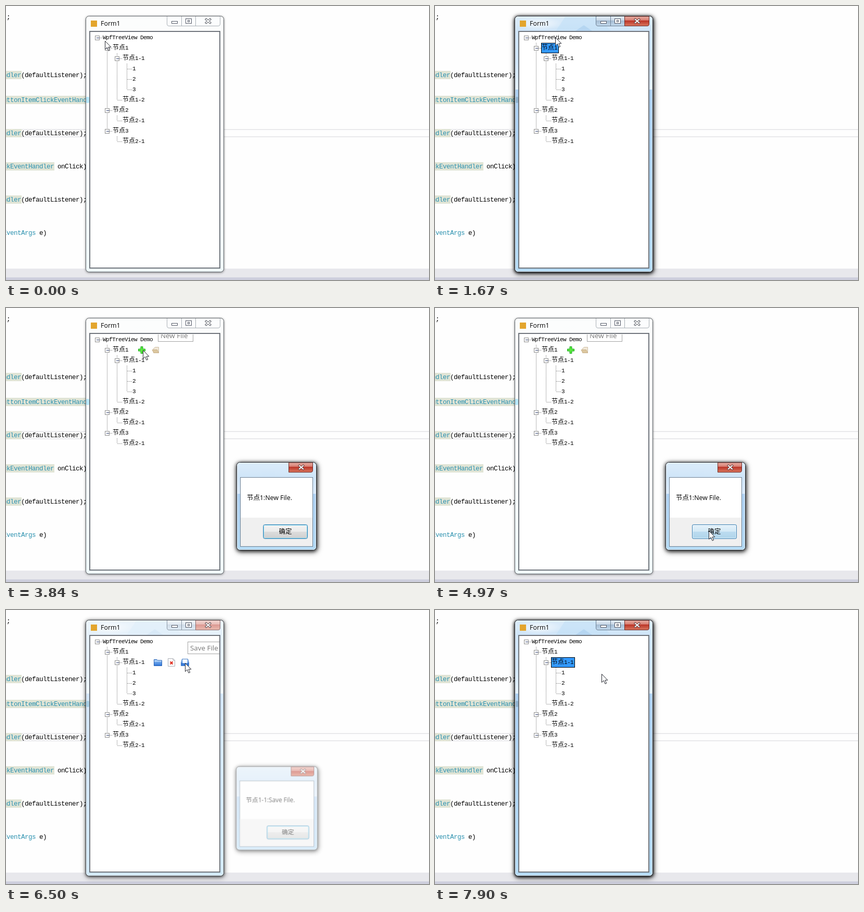
An HTML page for the animation above (8 s loop, 813 px wide and 528 px high).

```html
<!DOCTYPE html>
<html lang="zh">
<head>
<meta charset="utf-8">
<title>Tree view demo</title>
<style>
html, body { margin: 0; width: 100%; height: 100%; overflow: hidden; background: #fefefe; }
svg { display: block; width: 813px; height: 528px; }
text { white-space: pre; }
.code { font: 12.5px "Liberation Mono", monospace; letter-spacing: -.5px; }
.tree { font: 11px "Liberation Mono", monospace; letter-spacing: -.6px; }
.tree .han { font: 12px "Noto Sans CJK SC", "Noto Sans CJK", sans-serif; letter-spacing: 0; }
.ui { font: 12.4px "Open Sans", "Noto Sans CJK SC", "Noto Sans CJK", sans-serif; }
.tip text { font: 13.4px "Open Sans", sans-serif; fill: #777; }
.tip rect { fill: #fff; stroke: #a3a3a3; }
.type { fill: #2b91af; }
.mark { fill: #e0e4d5; }
.crisp { shape-rendering: crispEdges; }
.dots { stroke: #777; stroke-dasharray: 1 1; fill: none; }
.calm { filter: drop-shadow(0 1px 2px rgba(0,0,0,.45)); }
.deep { filter: drop-shadow(0 1px 3px rgba(0,0,0,.6)) drop-shadow(1px 2px 5px rgba(0,0,0,.75)); }

.anim { animation: 8s step-end -4ms infinite; }
#active { animation-name: active; }
#sel1 { animation-name: sel1; }
#sel2 { animation-name: sel2; }
#tools1 { animation-name: tools1; }
#tools2 { animation-name: tools2; }
#tip1 { animation-name: tip1; }
#tip2 { animation-name: tip2; }
#dlg1 { animation-name: dlg1; }
#dlg2 { animation-name: dlg2; }
#hot1 { animation-name: hot1; }
#hot2 { animation-name: hot2; }
#cursor { animation-name: move; }
#dlg1, #dlg2 { transform-box: fill-box; transform-origin: center; }

@keyframes active {
  0% { opacity: 0 } 1.625% { opacity: .6 } 3.5% { opacity: 1 }
  45% { opacity: .5 } 46.5% { opacity: 0 } 64% { opacity: .5 } 65.75% { opacity: 1 }
  81.25% { opacity: .5 } 83% { opacity: 0 } 95.375% { opacity: .5 } 97.125% { opacity: 1 }
}
@keyframes sel1 { 0%, 45%, 81.25% { opacity: 0 } 1.625%, 64% { opacity: 1 } }
@keyframes sel2 { 0% { opacity: 0 } 95.375% { opacity: 1 } }
@keyframes tools1 {
  0%, 20.875%, 29.375%, 64% { opacity: 0 }
  19.125%, 26%, 34.5% { opacity: 1 }
}
@keyframes tools2 { 0%, 34.5%, 95.375% { opacity: 0 } 29.375%, 70.875% { opacity: 1 } }
@keyframes tip1 { 0%, 64% { opacity: 0 } 41.625% { opacity: 1 } }
@keyframes tip2 { 0%, 95.375% { opacity: 0 } 77.75% { opacity: 1 } }
@keyframes dlg1 {
  0%, 65.75% { opacity: 0; transform: none }
  45% { opacity: .5; transform: scale(.95) }
  46.5% { opacity: .9; transform: scale(.99) }
  48% { opacity: 1; transform: none }
  64% { opacity: .4; transform: scale(.96) }
}
@keyframes dlg2 {
  0%, 97.125% { opacity: 0; transform: none }
  81.25% { opacity: .5; transform: scale(.95) }
  83% { opacity: .9; transform: scale(.99) }
  84.625% { opacity: 1; transform: none }
  95.375% { opacity: .4; transform: scale(.96) }
}
@keyframes hot1 { 0% { opacity: 0 } 60.375% { opacity: 1 } }
@keyframes hot2 { 0% { opacity: 0 } 90% { opacity: 1 } }
@keyframes move {
  0% { transform: translate(190px,67px) }
  10.75% { transform: translate(178px,120px) }
  12.375% { transform: translate(172px,200px) }
  14% { transform: translate(185px,247px) }
  15.75% { transform: translate(200px,170px) }
  17.375% { transform: translate(196px,112px) }
  19.125% { transform: translate(212px,82px) }
  20.875% { transform: translate(231px,60px) }
  22.375% { transform: translate(238px,52px) }
  24.25% { transform: translate(230px,60px) }
  26% { transform: translate(212px,76px) }
  27.625% { transform: translate(205px,85px) }
  29.375% { transform: translate(225px,96px) }
  31.125% { transform: translate(240px,96px) }
  32.875% { transform: translate(236px,92px) }
  34.5% { transform: translate(228px,84px) }
  36.25% { transform: translate(231px,80px) }
  38.125% { transform: translate(272px,80px) }
  41.625% { transform: translate(263px,81px) }
  55% { transform: translate(300px,130px) }
  56.75% { transform: translate(400px,270px) }
  58.625% { transform: translate(490px,390px) }
  60.375% { transform: translate(524px,428px) }
  62.125% { transform: translate(526px,429px) }
  65.75% { transform: translate(420px,320px) }
  67.375% { transform: translate(300px,170px) }
  68.875% { transform: translate(270px,125px) }
  70.875% { transform: translate(260px,105px) }
  72.75% { transform: translate(285px,103px) }
  74.375% { transform: translate(318px,102px) }
  76.125% { transform: translate(338px,101px) }
  77.75% { transform: translate(344px,102px) }
  84.625% { transform: translate(360px,130px) }
  86.375% { transform: translate(425px,280px) }
  88.125% { transform: translate(481px,402px) }
  90% { transform: translate(520px,430px) }
  91.75% { transform: translate(528px,432px) }
  97.125% { transform: translate(440px,300px) }
  98.75% { transform: translate(320px,123px) }
}
</style>
</head>
<body>
<svg viewBox="0 0 813 528">
  <defs>
    <linearGradient id="glass" x2="0" y2="1">
      <stop stop-color="#dcecfa"/><stop offset=".06" stop-color="#cfe5f8"/>
      <stop offset=".18" stop-color="#cfe5f9"/><stop offset=".287" stop-color="#e4f1fd"/>
      <stop offset=".287" stop-color="#abcff2"/><stop offset="1" stop-color="#b5dbf5"/>
    </linearGradient>
    <linearGradient id="pane" x2="0" y2="1">
      <stop stop-color="#dcecfa"/><stop offset=".17" stop-color="#cfe5f8"/>
      <stop offset=".36" stop-color="#dcebfb"/>
      <stop offset=".36" stop-color="#b0d2f3"/><stop offset="1" stop-color="#b5dbf5"/>
    </linearGradient>
    <linearGradient id="pale" x2="0" y2="1">
      <stop stop-color="#fcfdfd"/><stop offset=".5" stop-color="#f9fbfc"/><stop offset="1" stop-color="#eff8fa"/>
    </linearGradient>
    <linearGradient id="red" x2="0" y2="1">
      <stop stop-color="#e9b1a6"/><stop offset=".45" stop-color="#d5766a"/>
      <stop offset=".45" stop-color="#bb3528"/><stop offset="1" stop-color="#d9775f"/>
    </linearGradient>
    <linearGradient id="steel" x2="0" y2="1">
      <stop stop-color="#e3edf6"/><stop offset=".45" stop-color="#c6d6e6"/>
      <stop offset=".45" stop-color="#a5bcd3"/><stop offset="1" stop-color="#c3daee"/>
    </linearGradient>
    <linearGradient id="grey" x2="0" y2="1">
      <stop stop-color="#f3f3f3"/><stop offset=".5" stop-color="#ebebeb"/>
      <stop offset=".5" stop-color="#dddddd"/><stop offset="1" stop-color="#cfcfcf"/>
    </linearGradient>
    <linearGradient id="sky" x2="0" y2="1">
      <stop stop-color="#e6f2fa"/><stop offset=".5" stop-color="#d3e9f6"/>
      <stop offset=".5" stop-color="#bcdcf0"/><stop offset="1" stop-color="#b0d5ea"/>
    </linearGradient>
    <linearGradient id="blue" x2="0" y2="1">
      <stop stop-color="#9cc9f8"/><stop offset="1" stop-color="#2c72d6"/>
    </linearGradient>
    <radialGradient id="shine">
      <stop stop-color="#fff" stop-opacity=".75"/><stop offset="1" stop-color="#fff" stop-opacity="0"/>
    </radialGradient>
    <clipPath id="view"><path d="M162 51H410V504H162Z"/></clipPath>
    <path id="cross" d="M-3.700 -3.200L3.700 3.200M3.700 -3.200L-3.700 3.200"/>
    <g id="box" class="crisp">
      <rect x="-4.5" y="-4.5" width="9" height="9" fill="#fff"/>
      <rect x="-4" y="-4" width="8" height="8" fill="#f6f6f6" stroke="#919191"/>
      <path d="M-2 0H3" stroke="#3f4f80"/>
    </g>
    <g id="glyphs" fill="#fff" stroke="#535866">
      <rect x="318.5" y="29.5" width="11" height="4"/>
      <rect x="345.5" y="24.5" width="11" height="9"/><rect x="349.5" y="27.5" width="3" height="3"/>
    </g>
    <g id="close" stroke-linecap="square">
      <use href="#cross" stroke-width="4"/><use href="#cross" stroke="#fff" stroke-width="1.900"/>
    </g>
  </defs>

  <g id="editor" class="code"></g>

  <g class="calm">
    <rect x="153.5" y="19.5" width="265" height="493" rx="6" fill="url(#pale)" stroke="#5b6065"/>
  </g>
  <rect x="154" y="175" width="6" height="12" rx="2" fill="#b9e8fa"/>
  <path d="M309.500 20V35Q309.500 38.500 313 38.500H408Q411.500 38.500 411.500 35V20M337.500 20V38M364.500 20V38" fill="#fcfdfe" stroke="#a9afb5"/>
  <use href="#glyphs"/>
  <use href="#close" x="388.5" y="29" stroke="#60646c"/>

  <g id="active" class="anim">
    <rect class="deep" x="153.5" y="19.5" width="265" height="493" rx="6" fill="url(#glass)" stroke="#20272e"/>
    <rect x="154.5" y="20.5" width="263" height="491" rx="5" fill="none" stroke="#fff" stroke-opacity=".7"/>
    <path d="M232 48L250 21H309V39H330L338 48Z" fill="#bfdff7" opacity=".5"/>
    <path d="M270 48L286 37L302 48Z" fill="#a9cdec" opacity=".6"/>
    <ellipse cx="200" cy="34" rx="45" ry="13" fill="url(#shine)"/>
    <rect x="155" y="175" width="5" height="12" rx="2" fill="#8fb2cf"/>
    <path d="M309.500 20V35Q309.500 38.500 313 38.500H364.500V20M337.500 20V38" fill="url(#steel)" stroke="#6b7f93"/>
    <path d="M364.500 20V38.500H408Q411.500 38.500 411.500 35V20Z" fill="url(#red)" stroke="#6e2c28"/>
    <use href="#glyphs"/>
    <use href="#close" x="388.5" y="29" stroke="#6b4444"/>
  </g>

  <rect x="163" y="28" width="12" height="12" fill="#e3a52d"/>
  <text class="ui" x="182" y="38">Form1</text>
  <rect x="161" y="49" width="250" height="456" fill="#fff" stroke="#70757c" stroke-width="2"/>

  <g class="crisp" fill="#39f" stroke="#000">
    <rect id="sel1" class="anim" x="204.5" y="71.5" width="33" height="19"/>
    <rect id="sel2" class="anim" x="223.5" y="91.5" width="45" height="19"/>
  </g>
  <g id="tree" class="tree"></g>

  <g id="tools1" class="anim">
    <path d="M259 74.500h4v4.500h4.500v4h-4.500v4.500h-4v-4.500h-4.500v-4h4.500z" fill="#5be83f" stroke="#14a51a"/>
    <path d="M283.500 86.500V78L287 75.500H293.500V86.500Z" fill="#f1e8d8" stroke="#cdbfa6"/>
    <path d="M281 80.500H290.500L293.500 86.500H284Z" fill="#dcc79f" stroke="#c9b18a"/>
  </g>
  <g id="tools2" class="anim">
    <path d="M284.500 107.500V95.500H290L291.500 97H299.500V107.500Z" fill="url(#blue)" stroke="#2a63b4"/>
    <path d="M285 98.500H299" stroke="#e3f1ff"/>
    <path d="M311.500 93.500H321L324.500 97V108.500H311.500Z" fill="#fbfbfb" stroke="#adb0b6"/>
    <path d="M321 93.500V97H324.500" fill="none" stroke="#adb0b6"/>
    <path d="M315.500 99.500L320.500 104.500M320.500 99.500L315.500 104.500" stroke="#e02a1c" stroke-width="2"/>
    <path d="M338.500 94.500H349.500L351.500 102V107.500H336.500V102Z" fill="url(#blue)" stroke="#4a7fc6"/>
    <path d="M339.500 95H348.500V103H339.500Z" fill="#f3f8ff"/>
    <path d="M337 103.500H351" stroke="#2f6fcb" stroke-width="2"/>
  </g>
  <g clip-path="url(#view)" class="tip">
    <g id="tip1" class="anim"><rect x="292.5" y="41.5" width="67" height="23"/><text x="297" y="58">New File</text></g>
    <g id="tip2" class="anim"><rect x="349.5" y="61.5" width="67" height="23"/><text x="354" y="78">Save File</text></g>
  </g>

  <g id="dialogs" class="ui"></g>

  <path id="cursor" class="anim" d="M.5 .5V16.500L4.300 13L7 19.300L9.600 18.200L6.900 12.200H11.800Z" fill="#fff" stroke="#23252d"/>
</svg>
<script>
const fill = (id, html) => document.getElementById(id).innerHTML = html;

// Code behind the window: [centre y, type name, rest, highlighted]
const call = ['ndler', '(defaultListener);', true];
const lines = [
  [133, ...call],
  [181, 'uttonItemClickEventHandler', '', true],
  [245, ...call],
  [309, 'ckEventHandler', ' onClick)', true],
  [373, ...call],
  [437, 'EventArgs', ' e)', false]
];
fill('editor', `
  <path class="crisp" d="M0 238H813M0 252H813" stroke="#e9e9ec" stroke-width="2"/>
  <path d="M0 506H813V523H0Z" fill="#e8e8ec"/><path d="M0 523H813V528H0Z" fill="#cecfdd"/>
  <text x="1" y="25">;</text>` +
  lines.map(([y, type, rest, marked]) =>
    (marked ? `<rect class="mark" y="${y - 8}" width="${type.length * 7 - 5}" height="16"/>` : '') +
    `<text x="-6" y="${y + 4}"><tspan class="type">${type}</tspan>${rest}</text>`).join(''));

// Tree rows: [depth, label, has children]
const rows = [
  [0, 'WpfTreeView Demo', 1], [1, '节点1', 1], [2, '节点1-1', 1],
  [3, '1'], [3, '2'], [3, '3'], [2, '节点1-2'],
  [1, '节点2', 1], [2, '节点2-1'], [1, '节点3', 1], [2, '节点2-1']
];
const trunks = 'M194.500 71V241M213.500 91V181M232.500 111V161M213.500 211V221M213.500 251V261';
fill('tree', `<path class="dots crisp" d="${trunks}"/>` + rows.map(([depth, label, open], i) => {
  const x = 175.5 + depth * 19, y = 61.5 + i * 20;
  const text = label.replace('节点', '<tspan class="han">节点</tspan>');
  return `<path class="dots crisp" d="M${x} ${y}h9"/>` +
    (open ? `<use href="#box" x="${x}" y="${y}"/>` : '') +
    `<text x="${x + 10.5}" y="${y + 2.5}">${text}</text>`;
}).join(''));

function dialog(n, x, w, message) {
  const right = x + w - 7, bx = right - 96;
  const button = (paint, glow) =>
    `<rect x="${bx + .5}" y="417.500" width="85" height="27" rx="3" fill="url(#${paint})" stroke="#3c7fb1"/>
     <rect x="${bx + 1.5}" y="418.500" width="83" height="25" rx="2" fill="none" stroke="${glow}" stroke-opacity=".8"/>`;
  return `<g id="dlg${n}" class="anim">
    <rect class="deep" x="${x + .5}" y="297.500" width="${w - 1}" height="169" rx="6" fill="url(#pane)" stroke="#20272e"/>
    <rect x="${x + 1.5}" y="298.500" width="${w - 3}" height="167" rx="5" fill="none" stroke="#fff" stroke-opacity=".7"/>
    <path d="M${right - 46.5} 298V316.500H${right - 4}Q${right - .5} 316.500 ${right - .5} 313V298Z" fill="url(#red)" stroke="#6e2c28"/>
    <use href="#close" x="${right - 22.5}" y="307" stroke="#6b4444"/>
    <rect x="${x + 7.5}" y="326.500" width="${w - 15}" height="133" fill="#fff" stroke="#6f8193"/>
    <rect x="${x + 8}" y="404" width="${w - 16}" height="55" fill="#f0f0f0"/>
    <text x="${x + 20}" y="370">${message}</text>
    ${button('grey', '#5fd0f2')}
    <g id="hot${n}" class="anim">${button('sky', '#e8f6fd')}</g>
    <text x="${bx + 43}" y="435" text-anchor="middle">确定</text>
  </g>`;
}
fill('dialogs', dialog(1, 443, 154, '节点1:New File.') + dialog(2, 438, 165, '节点1-1:Save File.'));
</script>
</body>
</html>
```
